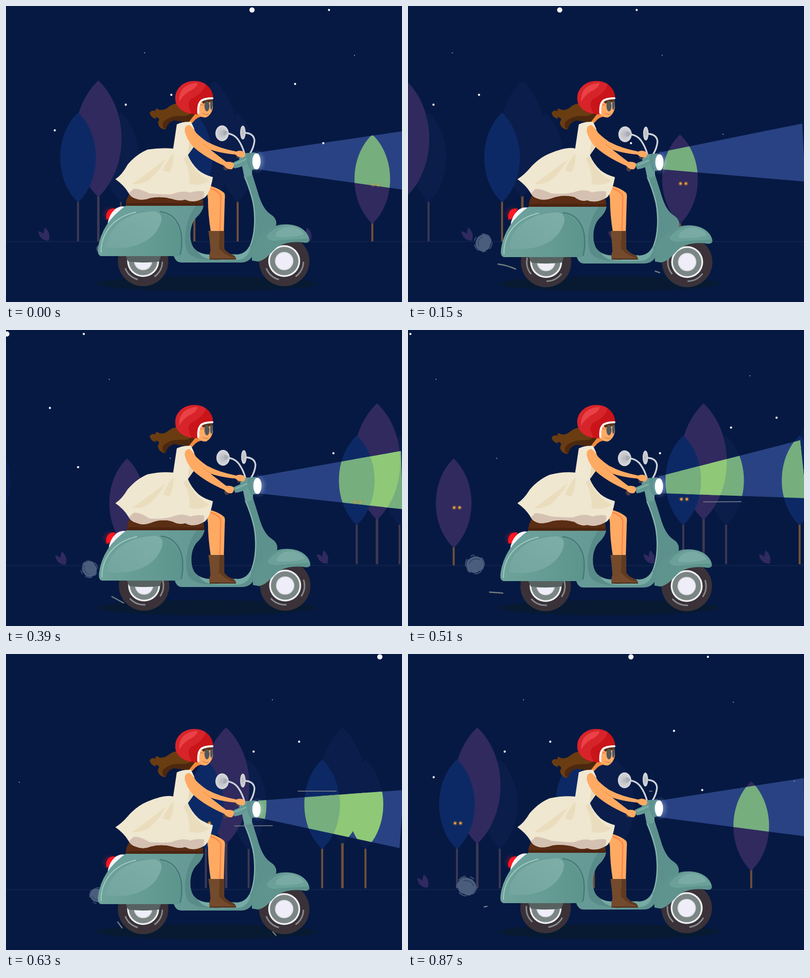
Animation, 800 px wide and 600 px high, one loop 0.9 s. Source, as an HTML page:

```html
<!DOCTYPE html>
<html lang="en">
<head>
<meta charset="utf-8">
<title>Night ride</title>
<style>
html, body { margin: 0; width: 100%; height: 100%; overflow: hidden; background: #061943; }
svg { display: block; width: 100vw; height: 100vh; }
.line { fill: none; stroke-linecap: round; stroke-linejoin: round; }
</style>
</head>
<body>
<svg viewBox="0 0 800 600">
  <defs>
    <clipPath id="cone"><polygon class="beam" points="508,297 800,254 800,372 508,331"/></clipPath>
    <radialGradient id="glow"><stop offset=".35" stop-color="#dcebff" stop-opacity=".75"/><stop offset="1" stop-color="#6f9bd8" stop-opacity="0"/></radialGradient>
    <radialGradient id="redGlow"><stop offset=".3" stop-color="#ff1a20" stop-opacity=".7"/><stop offset="1" stop-color="#ff1a20" stop-opacity="0"/></radialGradient>
    <linearGradient id="teal"><stop offset="0" stop-color="#6ea29d"/><stop offset=".5" stop-color="#669a96"/><stop offset="1" stop-color="#5a8e8a"/></linearGradient>
    <linearGradient id="panel"><stop offset="0" stop-color="#6fa39c"/><stop offset="1" stop-color="#5c958d"/></linearGradient>
    <linearGradient id="shine" x1="0" x2="1" y1="1" y2="0"><stop offset="0" stop-color="#73a69f"/><stop offset="1" stop-color="#7eaea7"/></linearGradient>
    <radialGradient id="mirror"><stop offset="0" stop-color="#b4b7be"/><stop offset=".4" stop-color="#c3c5cb"/><stop offset="1" stop-color="#d9dade"/></radialGradient>
    <g id="land"></g>
    <g id="lit"></g>
    <g id="stars" fill="#f4f5fa"></g>
    <g id="wheel">
      <circle r="51" fill="#3a3238"/>
      <g class="spin"><circle class="line" r="39" pathLength="360" stroke="#858b8c" stroke-width="3" stroke-dasharray="52 52 52 204" style="stroke-linecap:butt"/></g>
      <circle r="32.300" fill="#eef0f2"/>
      <circle r="28.800" fill="#7a8584"/>
      <circle r="18.600" fill="#d8dbe0"/>
      <circle r="17" fill="#efeef8"/>
    </g>
    <g id="eyes">
      <g fill="#c07a28" opacity=".35"><circle r="4.600"/><circle cx="11" r="4.600"/></g>
      <g fill="#e2a040"><circle r="2.400"/><circle cx="11" r="2.400"/></g>
    </g>
  </defs>

  <rect width="800" height="600" fill="#061943"/>
  <path d="M0 477.500H800" stroke="#1b2b50"/>
  <g class="scroll"><use href="#land"/><use href="#land" x="1058.300" y="-2.200"/></g>
  <polygon class="beam" points="508,297 800,254 800,372 508,331" fill="#294283"/>
  <g class="scroll"><use href="#stars"/><use href="#stars" x="1058.300" y="-2.200"/></g>
  <g clip-path="url(#cone)"><g class="scroll"><use href="#lit"/><use href="#lit" x="1058.300" y="-2.200"/></g></g>
  <g class="scroll"><use id="eyesA" href="#eyes"/><use id="eyesB" href="#eyes"/></g>
  <ellipse cx="406" cy="563" rx="223" ry="15.500" fill="#071a32"/>

  <g id="puff">
    <path d="M-16 -6Q-14 -14 -5 -14Q4 -18 11 -12Q18 -8 16 2Q15 11 6 13Q-3 17 -10 12Q-18 8 -16 -6Z" fill="#4a5d7d"/>
    <circle class="line" r="17.500" stroke="#4a5d7d" stroke-width="1.500" stroke-dasharray="14 9 7 14 16 12"/>
    <path class="line" d="M-10 7Q1 14 10 4" stroke="#2c3f63" stroke-width="1.300"/>
  </g>
  <g class="line" stroke="#76807f" stroke-width="2.400" style="stroke-linecap:butt">
    <path class="rear" pathLength="100" d="M262 560Q240 544 219 534Q200 525 181 523L142 526"/>
    <path class="rear" pathLength="100" d="M250 559L239 554L215 541Q200 533 188 533L160 531"/>
    <path class="rear" pathLength="100" d="M235 556L227 545Q220 536 211 527Q201 519 190 514Q177 509 165 510L153 513"/>
    <path id="front" pathLength="100" d="M546 571L538 562Q520 546 507 540L495 536L470 532"/>
  </g>
  <g id="tail">
    <circle cx="210" cy="422" r="17" fill="url(#redGlow)" opacity=".4"/>
    <path d="M203 433Q200 421 208 413Q214 409 222 411L209 432Z" fill="#ff1620"/>
  </g>

  <g id="bike">
    <path d="M205 444Q207 424 220 412Q230 404 243 407L226 428Z" fill="#f4f4f6"/>
    <use href="#wheel" x="277" y="517"/>
    <use href="#wheel" x="562" y="517"/>
    <path d="M241 504H314L309 518Q276 522 247 518Z" fill="#566160"/>
    <!-- mirrors -->
    <path class="line" d="M440 258Q459 257 469 271Q478 284 482 300M480 257Q501 257 502 273Q501 286 493 299" stroke="#cdd3d8" stroke-width="3.400"/>
    <ellipse cx="436.500" cy="258" rx="13.500" ry="16" fill="url(#mirror)"/>
    <path d="M439 252Q450 253 447 259Q443 263 439 263Z" fill="#a9adb4"/>
    <ellipse cx="478.500" cy="256.500" rx="5.500" ry="14" fill="url(#mirror)"/>
    <!-- body -->
    <path d="M243 404H399Q398 416 384 429C370 444 369 476 379 490Q390 504 414 504H465Q484 503 492 486C503 462 503 420 497 395Q491 370 480 345L497 340Q504 362 510 382Q519 412 534 422Q547 430 546 442Q543 460 520 478Q502 500 497 508Q490 520 474 520H354Q343 520 339 507H192Q184 504 186 492Q192 440 243 404Z" fill="url(#teal)"/>
    <path d="M399 404Q398 416 384 429C370 444 369 476 379 490Q390 504 414 504L465 503Q460 515 420 515Q380 515 368 500C354 474 365 428 384 404Z" fill="#598c89"/>
    <path d="M388 498Q398 504 414 504H465Q484 503 492 486L494 490Q488 514 466 515H420Q395 512 388 498Z" fill="#76aaa4"/>
    <path class="line" d="M483 347Q493 371 499 395C505 425 504 460 494 485" stroke="#9cc1bd" stroke-width="1.400"/>
    <path d="M497 341Q504 362 510 382Q519 412 534 422Q547 430 546 442Q543 460 516 480Q520 448 509 419Q499 390 489 345Z" fill="#5d918d"/>
    <path d="M497 516C494 493 507 459 547 445C581 436 611 453 613 474Q613 480 604 480Q573 475 550 487C535 498 528 514 509 518Z" fill="#5f948e"/>
    <path d="M526 468Q543 445 570 443Q603 445 612 471Q580 473 553 475Q533 479 526 468Z" fill="#6b9f99"/>
    <path d="M545 462Q555 446 578 447Q598 452 602 463Q575 471 545 468Z" fill="#79aaa4"/>
    <path d="M186 500C184 464 216 416 290 415C340 415 359 455 354 501Q353 507 346 507H193Q187 506 186 500Z" fill="url(#panel)"/>
    <path d="M203 489C204 457 231 418 300 416Q318 419 313 438C304 467 279 483 247 489Q221 492 203 489Z" fill="url(#shine)"/>
    <path class="line" d="M312 417C341 420 356 447 355 478Q355 492 352 503" stroke="#457a76" stroke-width="2.600"/>
    <path class="line" d="M192 500C191 467 211 429 262 418" stroke="#a7ccc6" stroke-width="1.800"/>
    <path d="M242 405Q242 389 251 379H390Q400 388 398 405Z" fill="#5b2d14"/>
    <path d="M242 399H398V405H242Z" fill="#4d2511"/>
    <!-- headset -->
    <path d="M470 307Q472 299 487 298L504 297V331L497 332V342Q489 348 481 345L476 320Z" fill="#6a9e99"/>
    <path d="M486 299L504 297V331L494 333Q484 318 486 299Z" fill="#5d928e"/>
    <ellipse cx="508" cy="315" rx="18" ry="25" fill="url(#glow)" opacity=".45"/>
    <ellipse cx="506" cy="315" rx="8.300" ry="16.500" fill="#fff"/>
    <path d="M457 318Q470 313 482 305Q490 307 487 319Q474 328 461 329Z" fill="#649994"/>
    <path class="line" d="M463 320L484 311" stroke="#7fb0aa" stroke-width="3"/>
    <ellipse cx="444" cy="327.500" rx="5" ry="6" fill="#493b43"/>
    <ellipse cx="469" cy="304" rx="4.500" ry="4.500" fill="#493b43"/>
  </g>

  <!-- rider -->
  <path d="M404 363L417 366Q432 371 441 379Q443 384 442 391L440 460H414Q408 422 408 391Z" fill="#ffaa63"/>
  <path class="line" d="M414 370Q433 377 434 387L432 458" stroke="#ff8448" stroke-width="2.600"/>
  <path d="M426 456H441L441 492Q447 501 460 505Q466 510 464 514H440L428 500Z" fill="#5f3b22"/>
  <path d="M409 456H432L430 492Q437 499 438 513Q425 516 412 513Q409 510 413 496Q412 476 409 456Z" fill="#734a2c"/>
  <path d="M431 492Q443 507 464 511V514H436Z" fill="#734a2c"/>
  <path class="line" d="M412 513H464" stroke="#4b2d1b" stroke-width="2"/>
  <g id="hair">
    <path d="M386 208L356 198Q340 195 328 205Q318 213 309 210Q301 205 302 213Q294 210 290 217Q293 227 304 229Q299 224 306 226Q312 229 307 235Q307 245 316 249Q326 253 322 243Q326 232 342 231Q358 236 373 235Q382 228 386 208Z" fill="#6a3c11"/>
    <path d="M391 219Q382 235 371 236Q354 234 340 232Q326 236 323 250Q313 246 318 235Q331 222 353 223Q374 224 378 212Z" fill="#4c280f"/>
  </g>
  <path d="M386 214Q378 224 368 237Q375 240 379 234Q387 224 398 224Z" fill="#f08a3c"/>
  <path d="M387 218L389 193L417 188L418 207Q414 222 404 226Q394 227 387 218Z" fill="#ffab66"/>
  <path d="M394 191L417 188V194L398 198Z" fill="#5c3514"/>
  <path class="line" d="M390 200L403 201M397 217Q404 222 409 219" stroke="#c66d33" stroke-width="1"/>
  <ellipse cx="406" cy="203" rx="5" ry="10.500" fill="#50575c"/>
  <ellipse cx="415" cy="201" rx="2.600" ry="9.500" fill="#50575c"/>
  <path d="M387 219.500C358 219.500 342 205 342 187C342 167 359 152 380.500 152C402 152 418.500 167 418.500 187C398 189 389 193 388 219Z" fill="#c91419"/>
  <path d="M375 218.500C354 215 342 203 342 187C342 167 359 152 380.500 152Q394 152 404 159Q396 179 374 188Q363 197 375 218.500Z" fill="#d7242a"/>
  <path d="M350 194C348 171 362 157 387 156Q386 166 370 173Q356 182 350 194Z" fill="#e94146"/>
  <path class="line" d="M388.500 217Q387 197 396 191Q404 187 417 187" stroke="#fff" stroke-width="4"/>
  <path id="skirt" fill="#efe7d0"/>
  <path id="under" fill="#d5c1b2"/>
  <path d="M255 361Q287 338 322 311Q311 333 290 352Q274 363 255 361ZM317 334Q326 311 338 299Q340 317 331 337ZM367 303Q378 337 411 354Q394 366 371 361Q372 329 358 309Z" fill="#eaddbd"/>
  <path d="M337 294L345 240Q357 234 374 235L380 248Q384 270 384 279L367 303Q351 306 337 294Z" fill="#f0e8d2"/>
  <path d="M371 270L380 282L367 302Z" fill="#e8d9b6"/>
  <g fill="#ffaa63">
    <path d="M408 276Q430 288 465 295Q474 291 481 296Q486 302 480 307L470 306L463 301Q430 298 411 290Z"/>
    <path d="M361 253Q361 242 370 241Q378 246 384 257Q397 270 414 280L414 292Q428 303 445 316Q455 315 460 319Q462 327 456 331Q447 332 441 324Q402 307 379 286Q364 270 361 253Z"/>
  </g>
  <path class="line" d="M398 279Q406 286 414 291" stroke="#e9863f" stroke-width="1"/>

  <g stroke="#747b89" stroke-width="2" stroke-linecap="round" opacity=".85"><line id="gustA" y1="348.500" y2="348"/><line id="gustB" y1="278" y2="278"/></g>
</svg>

<script>
const $ = s => document.querySelector(s), all = s => document.querySelectorAll(s);
const set = (el, o) => { for (const k in o) el.setAttribute(k, o[k]); };

// x, top, height, half width, leaf, trunk, lit leaf
const DARK = '#0a1d4b', BLUE = '#0d2965', PURPLE = '#302a5f';
const GREY = '#3d3953', BROWN = '#705039', MID = '#76ae7e', LIGHT = '#8fc877';
const trees = [
  [232, 216, 182, 36, DARK, GREY, MID],
  [186.500, 151, 236, 47, PURPLE, GREY, LIGHT],
  [145.500, 216, 182, 36, BLUE, GREY, MID],
  [468, 216, 182, 36, DARK, BROWN, LIGHT],
  [421.500, 151, 236, 47, DARK, BROWN, LIGHT],
  [380.500, 216, 182, 36, BLUE, BROWN, MID],
  [740, 260.500, 181, 36, PURPLE, BROWN, MID]
];
const leaf = (x, y, h, w, fill) => {
  const c = w * 4 / 3, a = y + h * .25, b = y + h * .75;
  return `<path d="M${x} ${y}C${x + c} ${a} ${x + c} ${b} ${x} ${y + h}C${x - c} ${b} ${x - c} ${a} ${x} ${y}Z" fill="${fill}"/>`;
};
const bush = x => `<path transform="translate(${x} 462)" d="M9 14Q-9 13 -12 -5Q-6 -5 -1 0Q-1 -9 2 -13Q15 -1 9 14Z" fill="#2f2a5f"/>`;
$('#land').innerHTML = trees.map(([x, y, h, w, fill, trunk]) =>
  `<path d="M${x} ${y + h - 4}V477" stroke="${trunk}" stroke-width="${w > 40 ? 5 : 4}"/>` + leaf(x, y, h, w, fill)
).join('') + [77, 310.500, 606.500].map(bush).join('');
$('#lit').innerHTML = trees.map(([x, y, h, w, , , fill]) => leaf(x, y, h, w, fill)).join('');

const stars = [[497, 8, 5.300], [652.500, 8, 2.200], [280, 95, 1], [704, 100, 1], [334, 180, 2.200],
  [242, 200, 2.200], [98.500, 252, 2.200], [584, 158, 2.200], [641, 278, 2.200], [827, 260, 1]];
$('#stars').innerHTML = stars.map(([x, y, r]) =>
  `<ellipse cx="${x}" cy="${y}" rx="${r}" ry="${r > 1 ? r : .8}"/>`).join('');

const LOOP = 900, STEP = 30, SPEED = 1.27;
const times = [0, 150, 390, 510, 630, 750, 870, LOOP];
const mix = (a, b, k) => a + (b - a) * k;
const clamp = (v, a = 0, b = 1) => Math.min(b, Math.max(a, v));
const at = (vals, t) => {
  let i = 0;
  while (t >= times[i + 1]) i++;
  return mix(vals[i], vals[(i + 1) % vals.length], (t - times[i]) / (times[i + 1] - times[i]));
};

// Shows the stretch from a to b percent of a path
const trim = (el, a, b) => {
  a = clamp(a, 0, 100); b = clamp(b, 0, 100);
  set(el, { 'stroke-dasharray': `0 ${a} ${b - a} 200`, visibility: b > a ? 'visible' : 'hidden' });
};

function dress(t) {
  const lift = at([1, 0, .8, .7, 0, 0, .8], t), ph = t / 300 * 2 * Math.PI;
  const y = (v, k) => v + 2 * Math.sin(ph + k);
  const a = y(390, 0), b = y(387, 1.8), c = y(393, 3.5), top = mix(299, 291, lift);
  const hem = `Q276 ${a + 5} 292 ${a - 1}Q314 ${b - 4} 336 ${b + 2}Q350 ${c + 4} 362 ${c}Q378 400 396 391`;
  $('#skirt').setAttribute('d', `M338 289Q${mix(322, 312, lift)} ${mix(284, 287, lift)} 286 ${top}Q264 ${top + 9} 246 ${top + 30}Q234 343 221 351Q238 363 247 378Q253 389 264 391${hem}Q411 387 418 347Q400 342 389 333Q374 319 367 301Z`);
  $('#under').setAttribute('d', `M248 380Q254 389 264 391${hem}Q402 386 400 376Q384 374 372 378Q356 ${b - 16} 334 ${b - 7}Q314 ${a - 8} 290 ${a - 10}Q266 ${c - 24} 257 371Z`);
}

function draw(t) {
  all('.scroll').forEach(g => set(g, { transform: `translate(${-SPEED * t} 0)` }));
  all('.beam').forEach(g => set(g, { transform: `rotate(${at([0, -3.1, -1.7, -6, 4.2, -4.4, -.5], t)} 506 314)` }));

  set($('#eyesA'), { x: 741, y: 360 + 3 * clamp(1 - t / 60), opacity: clamp(.45 + t / 120) });
  set($('#eyesB'), { x: 1200, y: 343 + 6 * clamp((480 - t) / 90), opacity: clamp((t - 345) / 75) });

  set($('#bike'), { transform: `translate(${at([0, 2, 2, 1, 0, 0, 1], t)} ${at([0, 2, 1, 2, 0, 0, -2], t)})` });
  const turn = at([10, 45, -10, -10, 10, 15, 38], t);
  set($('#wheel .spin'), { transform: `rotate(${turn - 8})` });

  const cycle = Math.floor(t / 300), p = t % 300;
  const size = clamp(.65 + p / 85) * (.88 + p / 1000);
  set($('#puff'), { transform: `translate(${193 - .275 * p} ${492 - .08 * p}) rotate(${p * .8}) scale(${size})` });
  const tail = (p - 60) * .44;
  all('.rear').forEach((el, i) => i === cycle ? trim(el, tail, tail + 30) : trim(el, 0, 0));
  const f = cycle === 1 || p > 190 ? 100 : (p - 30) * .45;
  trim($('#front'), f, f + 13);

  const g = 597 - 1.125 * (t - 510);
  set($('#gustA'), { x1: g, x2: g + 76, visibility: t >= 450 && t < 690 ? 'visible' : 'hidden' });
  set($('#gustB'), { x1: Math.max(488, 590 - 1.1 * (t - 630)), x2: at([0, 0, 800, 735, 667, 600, 493], t),
    visibility: t >= 570 ? 'visible' : 'hidden' });

  set($('#hair'), { transform: `rotate(${Math.sin(t / 150 * Math.PI)} 380 218)` });
  dress(t);
}

function tick(now) {
  draw(Math.floor(now % LOOP / STEP) * STEP);
  requestAnimationFrame(tick);
}
draw(0);
requestAnimationFrame(tick);
</script>
</body>
</html>
```
